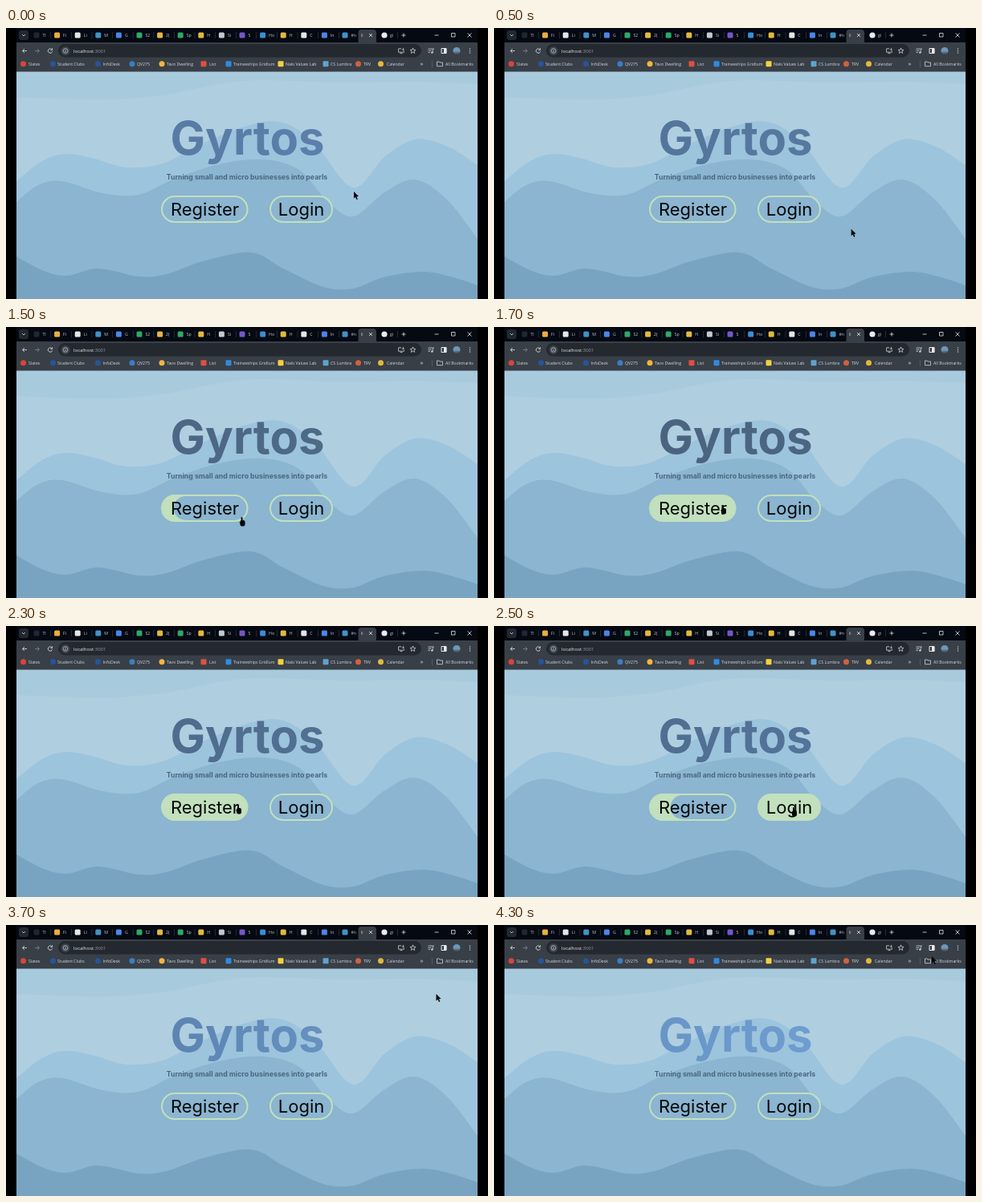
An HTML page for the animation above (4.4 s loop, 600 px wide and 338 px high).

```html
<!DOCTYPE html>
<html lang="en">
<head>
<meta charset="utf-8">
<title>Landing page</title>
<style>
  html, body { margin: 0; width: 100%; height: 100%; overflow: hidden; background: #000; }
  svg { display: block; width: 100vw; height: 100vh; }
  .ui { font-family: "Open Sans", "Noto Sans", sans-serif; }
  .page { font-family: Inter, sans-serif; text-anchor: middle; }
  .line { fill: none; }
</style>
</head>
<body>
<svg id="stage" viewBox="0 0 600 338" preserveAspectRatio="none"></svg>
<script>
const stage = document.getElementById('stage');
const LOOP = 4400, STEP = 100;
const BAR = '#393f47', LIGHT = '#d5d9de', ICON = '#d0d4d9', GREEN = '#c2e0bd', INK = '#050505';

// Layered waves: fill, then points along the upper edge
const waves = [
  ['#afcee0', [[13, 86], [60, 88], [130, 89], [200, 83], [270, 69], [320, 65], [420, 68], [510, 67], [587, 70]]],
  ['#9dc4dd', [[13, 191], [45, 166], [75, 157], [110, 163], [150, 174], [195, 169], [245, 144], [300, 122], [345, 118], [385, 145], [432, 199], [472, 160], [510, 139], [550, 148], [587, 171]]],
  ['#8bb5d0', [[13, 217], [40, 196], [70, 191], [120, 206], [165, 208], [210, 188], [265, 170], [320, 164], [365, 177], [400, 216], [432, 235], [470, 206], [508, 189], [548, 213], [587, 263]]],
  ['#78a4c1', [[13, 285], [45, 302], [75, 309], [115, 300], [165, 310], [200, 307], [245, 291], [305, 280], [345, 300], [395, 323], [432, 325], [470, 311], [520, 304], [560, 312], [587, 321]]]
];

// Icon colour and clipped label for each tab
const tabs = [
  ['#1d2833', 'TI'], ['#e9ae3c', 'Fi'], ['#e6e6e6', 'Li'], ['#3f93c6', 'M'], ['#4a86e8', 'G'],
  ['#2fa865', 'S2'], ['#e3b93c', '2('], ['#2fa865', 'Sp'], ['#e3b93c', 'H'], ['#c3c8cc', 'Si'],
  ['#7656c9', 'S'], ['#358fd6', 'Ho'], ['#e3b93c', 'H'], ['#e6e6e6', 'C'], ['#4a86e8', 'In'], ['#3f93c6', '#n']
];

// Icon x, icon colour, text x, label, corner radius of the icon
const bookmarks = [
  [21.5, '#d8453b', 28, 'Slates', 3.5], [58.5, '#25559a', 64, 'Student Clubs', 3.5],
  [114.5, '#25559a', 120.5, 'InfoDesk', 3.5], [157, '#3a7fc4', 163, 'QV275', 3.5],
  [194, '#f0b63d', 200, 'Tavo Dwelling', 3.5], [246, '#e0503f', 253, 'List', 1.2],
  [277, '#2f8be0', 283, 'Traineeships Gridlum', 1.2], [342, '#f5d13f', 348, 'Nalo Values Lab', 1.2],
  [398, '#5fa3d0', 404, 'CS Lumbra', 1.2], [438.5, '#d2603f', 445, 'TRV', 3.5], [466.5, '#e3b93c', 474, 'Calendar', 3.5]
];

// Pointer path: time, x, y of the tip
const path = [
  [0, 433, 204], [300, 440, 228], [600, 447, 262], [700, 449, 276], [900, 400, 307], [1100, 323.5, 294],
  [1200, 309, 287], [1400, 300, 248], [1600, 287, 226], [1700, 285, 222], [2300, 289, 223], [2400, 332, 225],
  [2500, 373, 226], [3000, 375, 226], [3100, 392, 234], [3200, 412.5, 258.5], [3300, 430, 257],
  [3500, 486, 240], [3600, 508, 226], [3700, 535.5, 86], [3800, 552, 56], [4000, 563, 37],
  [4200, 541, 26], [4300, 545, 39]
];

// Heading gradient: time, left rgb, right rgb
const tints = [
  [0, 88, 123, 165, 92, 127, 171], [1100, 79, 109, 143, 81, 113, 146], [1700, 74, 100, 128, 75, 102, 130],
  [2500, 79, 110, 145, 83, 116, 154], [3200, 86, 121, 161, 97, 136, 181],
  [3700, 91, 132, 177, 102, 145, 192], [4300, 103, 149, 198, 111, 157, 208]
];

const buttons = [
  { x: 193, w: 108.5, label: 'Register', tx: 247.5, on: 1475, off: 2368 },
  { x: 328, w: 79, label: 'Login', tx: 367.5, on: 2400, off: 3135 }
];

const box = (x, y, w, h, fill, r = 0) =>
  `<rect x="${x}" y="${y}" width="${w}" height="${h}" rx="${r}" fill="${fill}"/>`;
const dot = (x, y, r, fill) => `<circle cx="${x}" cy="${y}" r="${r}" fill="${fill}"/>`;
const stroke = (d, color = ICON, width = 0.8) =>
  `<path class="line" d="${d}" stroke="${color}" stroke-width="${width}"/>`;
const shape = (d, fill) => `<path d="${d}" fill="${fill}"/>`;
const text = (s, x, y, size, fill, kind = 'ui', weight = 400) =>
  `<text class="${kind}" x="${x}" y="${y}" font-size="${size}" font-weight="${weight}" fill="${fill}">${s}</text>`;

function wave([fill, p]) {
  let d = `M13 338L${p[0]}`;
  for (let i = 0; i < p.length - 1; i++) {
    const b = p[i], c = p[i + 1], a = p[i - 1] || b, e = p[i + 2] || c;
    d += `C${b.map((v, k) => v + (c[k] - a[k]) / 6)} ${c.map((v, k) => v - (e[k] - b[k]) / 6)} ${c}`;
  }
  return shape(d + 'L587 338Z', fill);
}

function tabStrip() {
  const items = tabs.map(([color, label], i) => {
    const x = 38 + i * 25.6;
    return box(x - 3.5, 5.5, 7, 7, color, 1.5) + text(label, x + 7.5, 11, 5.2, '#c6cad0') +
      (i < tabs.length - 1 ? box(x + 17.5, 5, 0.6, 8, '#3b414a') : '');
  });
  return box(13, 0, 574, 19, '#050912') + box(16, 3, 12, 12, '#23272f', 3) +
    stroke('M20 8l2 2l2 -2', LIGHT) + items.join('') +
    shape('M438.5 19V6q0 -4 4 -4h14.5q4 0 4 4v13z', BAR) +
    text('li', 442, 11, 5.2, LIGHT) +
    dot(471, 9, 3.6, '#e8eaed') + text('gi', 478, 11, 5.2, '#c6cad0') + box(487, 5, 0.6, 8, '#3b414a') +
    stroke('M452 7l4 4m0 -4l-4 4M492.5 9h5m-2.5 -2.5v5', '#e3e6e9') +
    stroke('M533.5 9h5M554.5 6.5h4.5v4.5h-4.5zM574.5 6.5l5 5m0 -5l-5 5', '#e3e6e9');
}

function star(x, y) {
  let d = '';
  for (let i = 0; i < 10; i++) {
    const a = i * Math.PI / 5 - Math.PI / 2, r = i % 2 ? 1.6 : 3.6;
    d += `${i ? 'L' : 'M'}${x + r * Math.cos(a)} ${y + r * Math.sin(a)}`;
  }
  return stroke(d + 'Z');
}

function toolbar() {
  return box(13, 18, 574, 36.5, BAR) + box(65, 20, 452, 16.5, '#24292f', 8.2) +
    stroke('M26 28.5h-5.5M23 26l-2.5 2.5l2.5 2.5', ICON, 0.9) +
    stroke('M36 28.5h5.5M39 26l2.5 2.5l-2.5 2.5', '#777e86', 0.9) +
    stroke('M57.6 29.3a2.7 2.7 0 1 1 -0.9 -2.9M57.6 25.2v2.2h-2.2', ICON, 0.9) +
    dot(74, 28.5, 5.5, '#3d434b') +
    stroke('M71.2 28.5a2.8 2.8 0 1 1 5.6 0a2.8 2.8 0 1 1 -5.6 0M74 28v2', ICON, 0.7) + dot(74, 26.9, 0.4, ICON) +
    text('localhost<tspan fill="#959ca4">:3001</tspan>', 84, 30.6, 6, '#e8eaed') +
    stroke('M492 25.8h-3.4v4.4h6.8v-1.6M490.5 31.6h3M494.4 24.8v2.8M493 26.6l1.4 1.4l1.4 -1.4') +
    star(506.5, 28.5) +
    stroke('M525.5 26h5.5M525.5 28.2h4M525.5 30.4h2.5M531.3 30.6v-4.6h1.7') + dot(530.3, 30.6, 1.2, ICON) +
    stroke('M542 25.5h6v6h-6z', '#e8eaed', 1) + box(545, 25.5, 3.2, 6, '#e8eaed') +
    dot(561, 28.5, 4.5, 'url(#avatar)') +
    [26, 28.5, 31].map(y => dot(577.5, y, 0.7, ICON)).join('');
}

function bookmarkBar() {
  return bookmarks.map(([x, color, tx, label, r]) =>
    box(x - 3.5, 41.3, 7, 7, color, r) + text(label, tx, 46.7, 5.2, LIGHT)).join('') +
    text('»', 515.5, 47, 8, LIGHT) + box(530, 41, 0.7, 8, '#606873') +
    stroke('M536.5 42h2.5l1 1h3.5v4.7h-7z') +
    text('All Bookmarks', 547, 46.7, 5.2, LIGHT);
}

function button(b, i) {
  return `<clipPath id="clip${i}">${box(b.x + 1.5, 210.5, b.w - 3, 31, INK, 15.5)}</clipPath>
    <path id="fill${i}" clip-path="url(#clip${i})" fill="${GREEN}" fill-rule="evenodd"/>
    <rect class="line" x="${b.x + 1}" y="210" width="${b.w - 2}" height="32" rx="16" stroke="${GREEN}" stroke-width="2"/>` +
    text(b.label, b.tx, 234, 22, '#060809', 'page');
}

stage.innerHTML = `<defs>
    <linearGradient id="tint" gradientUnits="userSpaceOnUse" x1="203" x2="398" y1="0" y2="0">
      <stop id="left"/><stop id="right" offset="1"/>
    </linearGradient>
    <linearGradient id="avatar" x2="0" y2="1">
      <stop stop-color="#5b9bd0"/><stop offset=".5" stop-color="#7597ad"/><stop offset="1" stop-color="#3d4550"/>
    </linearGradient>
  </defs>` +
  box(0, 0, 600, 338, '#000') + box(13, 54, 574, 284, '#a8cadd') + waves.map(wave).join('') +
  text('Gyrtos', 300.5, 157.5, 58, 'url(#tint)', 'page', 700) +
  text('Turning small and micro businesses into pearls', 300, 188.5, 8.75, '#4a6681', 'page', 700) +
  buttons.map(button).join('') + tabStrip() + toolbar() + bookmarkBar() +
  `<g id="pointer">
    <g id="arrow">${shape('M0 0V8.6L2 6.8L3.4 10L4.8 9.4L3.4 6.3L6 6.1Z', INK)}</g>
    <g id="hand">${box(-0.9, 0, 1.9, 8, INK, 0.9) + box(-2, 4, 6, 7.5, INK, 2.2) + shape('M-3.2 6L-1 7L0 11Z', INK)}</g>
  </g>`;

const el = id => document.getElementById(id);
const left = el('left'), right = el('right'), pointer = el('pointer'), arrow = el('arrow'), hand = el('hand');
const fills = buttons.map((b, i) => el('fill' + i));

function sample(keys, t) {
  let i = 0;
  while (i < keys.length - 2 && t >= keys[i + 1][0]) i++;
  const a = keys[i], b = keys[i + 1];
  const k = Math.min(1, (t - a[0]) / (b[0] - a[0]));
  return a.slice(1).map((v, j) => v + (b[j + 1] - v) * k);
}

// CSS "ease" timing curve, solved by bisection
function ease(x) {
  if (x <= 0) return 0;
  if (x >= 1) return 1;
  const curve = (u, p, q) => 3 * p * u * (1 - u) ** 2 + 3 * q * u * u * (1 - u) + u ** 3;
  let lo = 0, hi = 1;
  for (let i = 0; i < 20; i++) {
    const mid = (lo + hi) / 2;
    if (curve(mid, 0.25, 0.25) < x) lo = mid; else hi = mid;
  }
  return curve(lo, 0.1, 1);
}

// The fill is the pill's inside minus the same shape moved to the right
function fillPath(b, t) {
  const shift = 143 * (ease((t - b.on) / 250) - ease((t - b.off) / 250));
  if (shift <= 0) return '';
  const span = b.w - 34;
  return `M${b.x} 209h${b.w}v34h${-b.w}z` +
    `M${b.x + 17 + shift} 211h${span}a15 15 0 0 1 0 30h${-span}a15 15 0 0 1 0 -30z`;
}

function draw(t) {
  const c = sample(tints, t);
  left.setAttribute('stop-color', `rgb(${c.slice(0, 3)})`);
  right.setAttribute('stop-color', `rgb(${c.slice(3)})`);
  buttons.forEach((b, i) => fills[i].setAttribute('d', fillPath(b, t)));
  pointer.setAttribute('transform', `translate(${sample(path, t)})`);
  const over = buttons.some(b => t >= b.on && t < b.off);
  arrow.setAttribute('display', over ? 'none' : 'inline');
  hand.setAttribute('display', over ? 'inline' : 'none');
}

const start = performance.now();
function tick() {
  const t = (performance.now() - start) % LOOP;
  draw(Math.floor(t / STEP) * STEP);
  requestAnimationFrame(tick);
}
tick();
</script>
</body>
</html>
```
